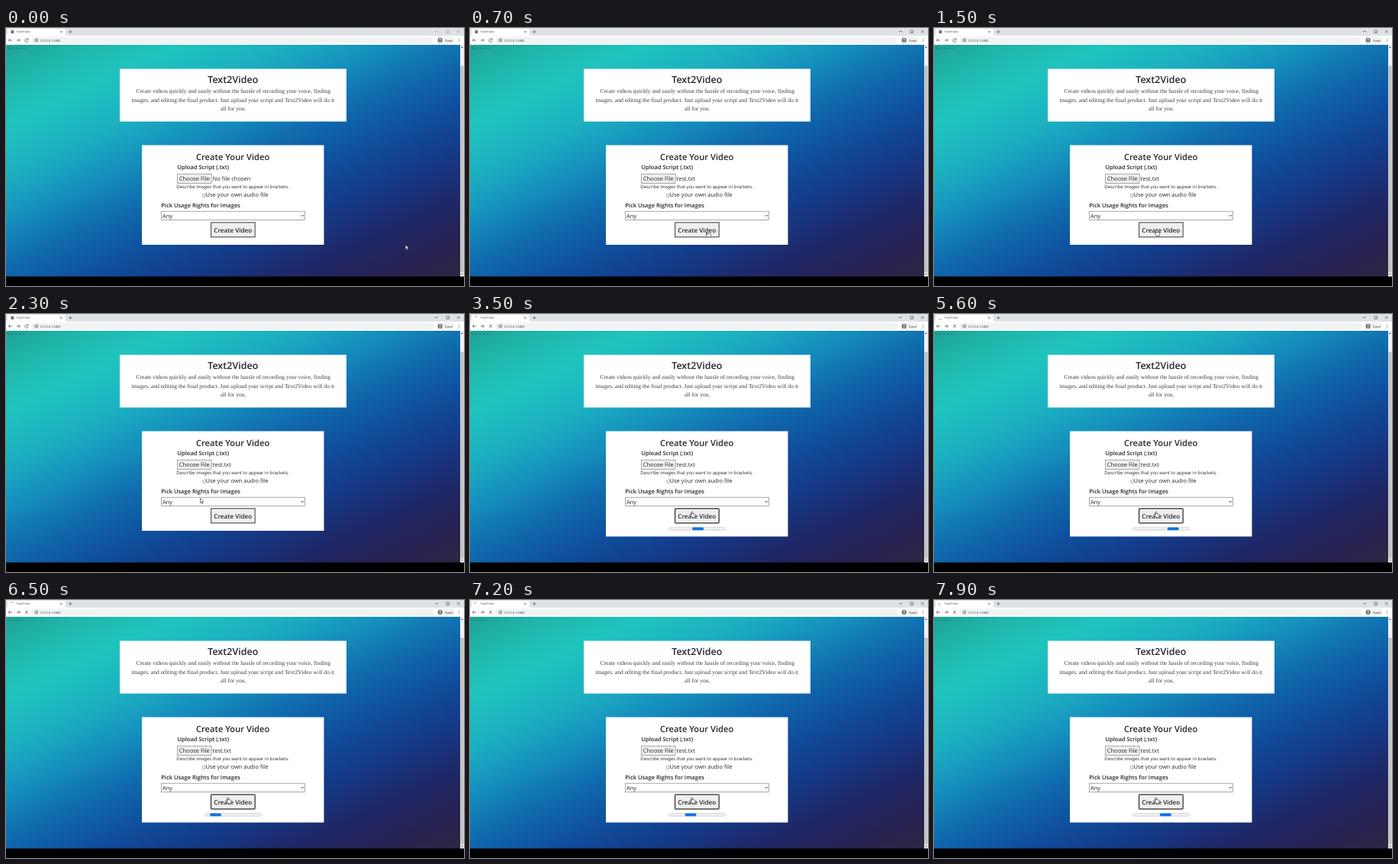
Animation, 600 px wide and 338 px high, one loop 8000 ms. Source, as an HTML page:

```html
<!DOCTYPE html>
<html lang="en">
<head>
<meta charset="utf-8">
<title>Text2Video</title>
<style>
  html, body { margin: 0; width: 100%; height: 100%; overflow: hidden; background: #000; }
  svg { display: block; width: 100vw; height: 100vh; }
  text { font-family: "Open Sans", sans-serif; font-size: 7.53px; fill: #24272b; text-rendering: geometricPrecision; }
  .mid { text-anchor: middle; }
  .semi { font-weight: 600; }
  .serif { font-family: "Liberation Serif", serif; font-size: 7.6px; fill: #3c3f43; text-anchor: middle; }
  .ui { font-family: Roboto, sans-serif; fill: #4a4d52; }
  .icon { fill: none; stroke: #5f6368; stroke-width: .8; }
  .field { stroke: #858585; stroke-width: .7; }
</style>
</head>
<body>
<svg viewBox="0 0 600 338">
  <defs>
    <linearGradient id="sky" gradientUnits="userSpaceOnUse" x1="0" y1="22" x2="220" y2="497">
      <stop offset="0" stop-color="#1fa094"/>
      <stop offset=".08" stop-color="#20b6aa"/>
      <stop offset=".18" stop-color="#20c4be"/>
      <stop offset=".3" stop-color="#1cafc0"/>
      <stop offset=".4" stop-color="#158fbd"/>
      <stop offset=".5" stop-color="#106cae"/>
      <stop offset=".6" stop-color="#0f519f"/>
      <stop offset=".7" stop-color="#133c8b"/>
      <stop offset=".82" stop-color="#1e2868"/>
      <stop offset=".92" stop-color="#272152"/>
      <stop offset="1" stop-color="#2f2542"/>
    </linearGradient>
  </defs>

  <rect width="600" height="338"/>
  <rect y="22" width="595" height="303.5" fill="url(#sky)"/>
  <path d="M2.5 26.5H28" stroke="#123c40" stroke-width="1" stroke-dasharray="1.6 3.4" opacity=".7"/>

  <!-- browser bar -->
  <rect width="600" height="10" fill="#dee1e6"/>
  <path d="M0 10Q2 10 2 8V3Q2 1 4 1H76Q78 1 78 3V8Q78 10 80 10Z" fill="#fff"/>
  <rect y="10" width="600" height="12" fill="#fff"/>
  <rect x="33" y="11.5" width="527" height="9" rx="4.5" fill="#f1f3f4"/>
  <g id="page">
    <circle cx="8.3" cy="5" r="2.2" fill="#5f6368"/>
    <path d="M7.2 4.2l1.3 .5-.6 1.2z" fill="#fff"/>
  </g>
  <path id="spin" d="M8.3 2.8A2.2 2.2 0 0 0 6.4 6.1" class="icon" stroke-opacity=".65"/>
  <text class="ui" x="13.5" y="6.4" style="font-size:3.6px">Text2Video</text>
  <path class="icon" d="M71.2 3.8l2.4 2.4m0-2.4l-2.4 2.4M82.3 5h4M84.3 3v4"/>
  <path id="controls" class="icon" d="M562 4.6h4M577 3h3.4v3.4H577zM591 2.9l3.4 3.4m0-3.4L591 6.3"/>
  <path class="icon" d="M8 16H3.4m2-2l-2 2 2 2"/>
  <path class="icon" d="M13.8 16h4.6m-2-2l2 2-2 2"/>
  <path id="reload" class="icon" d="M28.6 14.6A2.2 2.2 0 1 0 29.2 16.5M29.1 13.6V15.2H27.4"/>
  <path id="stop" class="icon" d="M25.2 14.2l3.6 3.6m0-3.6l-3.6 3.6"/>
  <g class="icon">
    <circle cx="39.8" cy="16" r="2"/>
    <path d="M39.8 15.8v1.2M39.8 14.7v.5"/>
  </g>
  <text class="ui" x="44.3" y="17.6" style="font-size:4.1px">127.0.0.1:5000</text>
  <rect x="564" y="11.5" width="24" height="9" rx="4.5" fill="#f1f3f4"/>
  <circle cx="568.7" cy="16" r="3" fill="#5f6368"/>
  <circle cx="568.7" cy="15.2" r="1" fill="#fff"/>
  <path d="M566.9 17.7q1.8-1.6 3.6 0z" fill="#fff"/>
  <text class="ui" x="575" y="17.6" style="font-size:4px">Guest</text>
  <path d="M593.5 13.6v.9m0 1v.9m0 1v.9" stroke="#5f6368" stroke-width=".9"/>

  <!-- scrollbar -->
  <rect x="595" y="22" width="5" height="303.5" fill="#f1f1f1"/>
  <rect x="595.4" y="49.5" width="4.2" height="270.5" fill="#c1c1c1"/>
  <path d="M596 26l1.5-1.7 1.5 1.7zM596 321.8l1.5 1.7 1.5-1.7z" fill="#505050"/>

  <!-- intro card -->
  <rect x="149" y="53.5" width="297" height="69" fill="#fff"/>
  <text class="mid semi" x="297.3" y="72" style="font-size:12.55px">Text2Video</text>
  <text class="serif" x="297.7" y="85.2">Create videos quickly and easily without the hassle of recording your voice, finding</text>
  <text class="serif" x="297.2" y="96.6" style="font-size:7.68px">images, and editing the final product. Just upload your script and Text2Video will do it</text>
  <text class="serif" x="297.7" y="107.8">all for you.</text>

  <!-- form card -->
  <rect id="card" x="178" y="153.5" width="238.5" height="130.5" fill="#fff"/>
  <text class="mid semi" x="297.1" y="172.7" style="font-size:11.2px">Create Your Video</text>
  <text class="semi" x="224.5" y="185.4">Upload Script (.txt)</text>
  <rect class="field" x="224.5" y="191.2" width="44.6" height="12.2" fill="#efefef"/>
  <text class="mid" x="246.8" y="200.1">Choose File</text>
  <text id="file" x="270.6" y="200.1">No file chosen</text>
  <text class="mid" x="297.1" y="210.3" style="font-size:5.97px">Describe images that you want to appear in brackets.</text>
  <rect class="field" x="257.6" y="217.7" width="3.6" height="3.6" rx=".6" fill="#fff"/>
  <text x="261.6" y="221.2" style="font-size:7.48px">Use your own audio file</text>
  <text class="semi" x="203.2" y="234.8">Pick Usage Rights for Images</text>
  <rect class="field" x="203.4" y="240.2" width="188.2" height="11.2" fill="#fff"/>
  <text x="205" y="248.7">Any</text>
  <path d="M387 245l1.6 1.6 1.6-1.6" fill="none" stroke="#222" stroke-width=".9"/>
  <rect id="button" x="268.6" y="254.8" width="57.6" height="19" fill="#efefef" stroke-width="1.2"/>
  <text class="mid semi" x="297.3" y="267.9" style="font-size:8.15px">Create Video</text>
  <g id="bar">
    <rect x="260.3" y="279.4" width="74.6" height="3.8" rx="1.9" fill="#efefef" stroke="#c4c4c4" stroke-width=".6"/>
    <rect id="chunk" y="279.4" width="15" height="3.8" rx="1.6" fill="#0b75e0"/>
  </g>

  <g id="pointer">
    <path id="arrow" d="M0 0V6.2L1.5 4.9 2.5 7.1 3.5 6.7 2.5 4.5H4.4Z" fill="#fff" stroke="#222" stroke-width=".6"/>
    <path id="hand" d="M-.8 .8Q0-.5 .7 .8V3.2L3.4 3.7Q4.2 4 4 5L3.4 7.8H-.2L-2.2 4.8Q-2-.5-.8 4.6Z" fill="#fff" stroke="#222" stroke-width=".6"/>
  </g>
</svg>
<script>
const LOOP = 8000, PICKED = 120, SUBMIT = 2714, SWEEP = 625, SPIN = 600;
const el = id => document.getElementById(id);
const show = (id, on) => el(id).setAttribute("visibility", on ? "visible" : "hidden");
const set = (id, name, value) => el(id).setAttribute(name, value);

// pointer stops: time, x, y
const path = [
  [0, 523.3, 284], [250, 523.3, 284],
  [800, 291.8, 264.5], [1650, 291.8, 264.5],
  [2050, 254.5, 241.5], [2350, 254.5, 241.5],
  [2650, 291.2, 258.5], [LOOP, 291.2, 258.5]
];

function pointerAt(t) {
  const i = Math.max(1, path.findIndex(stop => stop[0] >= t));
  const [t0, x0, y0] = path[i - 1], [t1, x1, y1] = path[i];
  const k = (t - t0) / (t1 - t0);
  const e = k * k * (3 - 2 * k);
  return [x0 + (x1 - x0) * e, y0 + (y1 - y0) * e];
}

function draw(now) {
  const t = now % LOOP;
  const picked = t >= PICKED;
  const busy = t >= SUBMIT;

  const [x, y] = pointerAt(t);
  const over = x > 268 && x < 327 && y > 254 && y < 274;
  set("pointer", "transform", `translate(${x} ${y})`);
  show("hand", over);
  show("arrow", !over);

  // the window is inactive until the file dialog has closed
  el("file").textContent = picked ? "test.txt" : "No file chosen";
  set("controls", "opacity", picked ? 1 : .45);

  for (const id of ["bar", "spin", "stop"]) show(id, busy);
  for (const id of ["page", "reload"]) show(id, !busy);
  set("card", "height", busy ? 138 : 130.5);
  set("button", "stroke", busy ? "#2a2a2a" : "#55585c");
  set("button", "rx", busy ? 1 : 0);

  if (busy) {
    const p = (t - SUBMIT) / SWEEP % 1;
    set("chunk", "x", 260 + 120 * Math.min(p, 1 - p));
    set("spin", "transform", `rotate(${-360 * (t / SPIN % 1)} 8.3 5)`);
  }
}

const start = performance.now();
function tick() {
  draw(performance.now() - start);
  requestAnimationFrame(tick);
}
tick();
</script>
</body>
</html>
```
